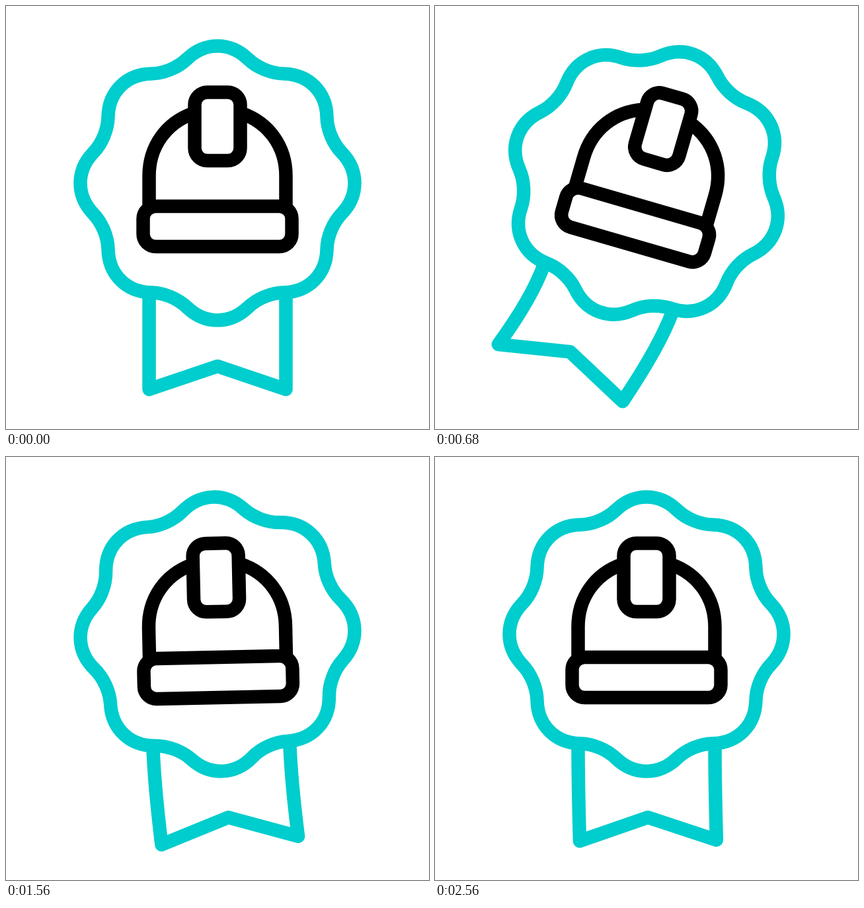
Recreate the animation shown at these times as an HTML page with a canvas. Size 640x640 px, loop 2.6 s.

```html
<!DOCTYPE html>
<html>
<head>
<meta charset="utf-8">
<style>
  html, body { margin: 0; width: 100%; height: 100%; overflow: hidden; background: #fff; }
  canvas { display: block; }
</style>
</head>
<body>
<canvas id="stage" width="640" height="640"></canvas>
<script>
const ctx = document.getElementById('stage').getContext('2d');
const LOOP = 2600, DEG = Math.PI / 180;
const TEAL = '#00cdcd', BLACK = '#000';

// Eased swing: from rest at `start`, reaching peaks[0] at `first`, then one peak every `step` ms.
function swing(t, start, first, step, peaks) {
  if (t <= start) return 0;
  const ease = p => (1 - Math.cos(Math.PI * p)) / 2;
  if (t < first) return peaks[0] * ease((t - start) / (first - start));
  const i = Math.floor((t - first) / step);
  const from = peaks[i] || 0, to = peaks[i + 1] || 0;
  return from + (to - from) * ease((t - first) / step - i);
}

function rosette() {
  ctx.save();
  ctx.beginPath();
  ctx.moveTo(-46, -188);
  for (let i = 0; i < 8; i++) {
    ctx.bezierCurveTo(-33.5, -200, -17.5, -207.5, 0, -207.5);
    ctx.bezierCurveTo(17.5, -207.5, 33.5, -200, 46, -188);
    ctx.bezierCurveTo(60, -174.6, 81, -165.9, 100.4, -165.5);
    ctx.rotate(45 * DEG);
  }
  ctx.closePath();
  ctx.restore();
  ctx.stroke();
}

// The tail hangs from the rosette; its lower edge shifts by `bend` and tilts with it.
function ribbon(bend) {
  const tilt = bend * 0.2 * DEG, c = Math.cos(tilt), s = Math.sin(tilt), pivot = 300;
  const bent = (x, y) => [
    bend + x * c + (y - pivot) * s,
    Math.abs(bend) * 0.1 + pivot - x * s + (y - pivot) * c
  ];
  const left = bent(-103.5, 312), tip = bent(0, 277), right = bent(103.5, 312);
  ctx.beginPath();
  ctx.moveTo(-103.5, 168);
  ctx.quadraticCurveTo(-103.5, 224, ...left);
  ctx.lineTo(...tip);
  ctx.lineTo(...right);
  ctx.quadraticCurveTo(103.5, 224, 103.5, 168);
  ctx.stroke();
}

function helmet() {
  ctx.beginPath();
  ctx.roundRect(-112.5, 56, 225, 61, 19);
  ctx.roundRect(-34.5, -116.5, 69, 103.5, 19);
  for (const side of [-1, 1]) {
    ctx.moveTo(side * 103.5, 56);
    ctx.lineTo(side * 103.5, 10);
    ctx.bezierCurveTo(side * 103.5, -34, side * 78, -70, side * 37, -84.5);
  }
  ctx.stroke();
}

function draw(now) {
  const t = now % LOOP;
  const badgeTurn = swing(t, 0, 360, 320, [-20, 20, -10, 10, -4, 4]);
  const bend = swing(t, 40, 400, 320, [26, -25, 20, -12, 16, -26, 16]);
  const helmetTurn = swing(t, 280, 560, 280, [-20, 21, -11, 10, -5, 1.2]);

  ctx.clearRect(0, 0, 640, 640);
  ctx.save();
  ctx.lineWidth = 20.5;
  ctx.lineJoin = 'round';
  ctx.translate(320, 268);
  ctx.rotate(badgeTurn * DEG);
  ctx.strokeStyle = TEAL;
  ribbon(bend);
  rosette();
  ctx.translate(0, -21);
  ctx.rotate(helmetTurn * DEG);
  ctx.strokeStyle = BLACK;
  helmet();
  ctx.restore();
  requestAnimationFrame(draw);
}
requestAnimationFrame(draw);
</script>
</body>
</html>
```
